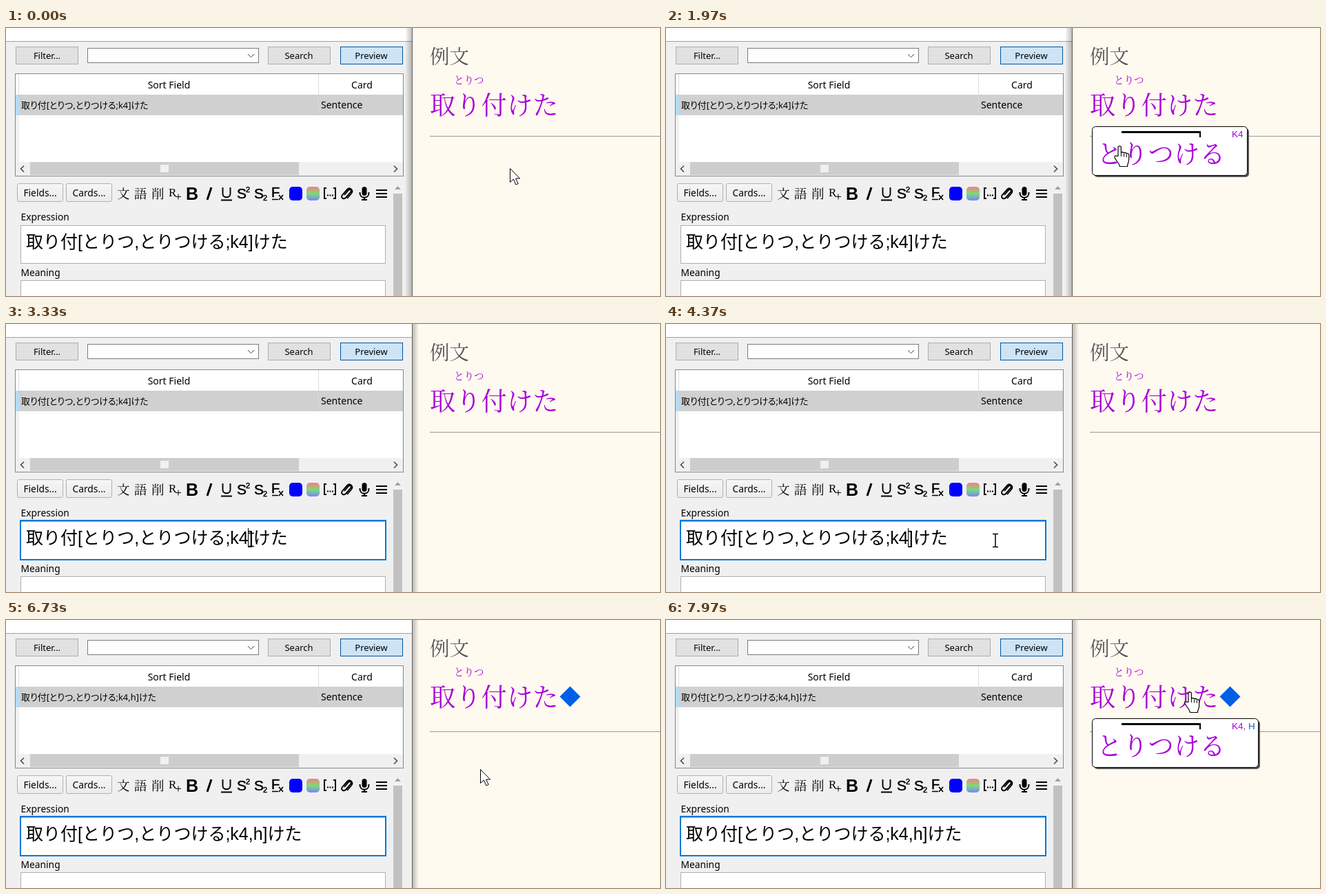
An HTML page that plays this animation: 949x390 px, repeating every 8000 ms.

```html
<!DOCTYPE html>
<html lang="ja">
<head>
<meta charset="utf-8">
<title>Card preview</title>
<style>
html, body { margin: 0; width: 100%; height: 100%; overflow: hidden; background: #f0f0f0; }
svg { display: block; }
text { font: 13.8px "Noto Sans", "Noto Sans CJK JP", sans-serif; white-space: pre; }
.btn text { font-size: 13px; }
.mid { text-anchor: middle; }
.head text { font-size: 14px; }
.field text { font: 300 25px "Liberation Sans", "Noto Sans CJK JP", sans-serif; }
.row { font-feature-settings: "palt"; font-size: 12.95px; }
.serif text { font-family: "Noto Serif CJK JP", "Noto Serif JP", "Noto Sans CJK JP", serif; font-weight: 300; }
.icons text { font: 21px "Liberation Sans", sans-serif; }
.icons .kanji { font: 18.5px "Noto Serif CJK JP", "Noto Sans CJK JP", serif; }
.icons .thick { stroke: #000; stroke-width: .5; }
.icons .small { font-size: 11px; }
.line { fill: none; stroke: #000; }
</style>
</head>
<body>
<svg width="949" height="390" viewBox="0 0 949 390">
  <defs>
    <linearGradient id="face" x2="0" y2="1"><stop stop-color="#f6f6f6"/><stop offset="1" stop-color="#ebebeb"/></linearGradient>
    <linearGradient id="hues" x2="0" y2="1"><stop stop-color="#ff7888"/><stop offset=".5" stop-color="#77dd77"/><stop offset="1" stop-color="#7b83ff"/></linearGradient>
    <linearGradient id="dim"><stop stop-opacity="0"/><stop offset="1" stop-opacity=".25"/></linearGradient>
    <linearGradient id="dimR"><stop stop-opacity=".25"/><stop offset="1" stop-opacity="0"/></linearGradient>
  </defs>

  <rect width="949" height="390" fill="#f0f0f0"/>
  <rect width="589" height="19" fill="#fff"/>
  <rect y="19" width="589" height="1" fill="#a0a0a0"/>

  <g class="btn mid" fill="#e1e1e1" stroke="#adadad">
    <rect x="14.5" y="27.5" width="90" height="25"/>
    <rect x="380.5" y="27.5" width="90" height="25"/>
    <rect x="485.5" y="27.5" width="90" height="25" fill="#cce4f7" stroke="#005499"/>
    <rect x="118.5" y="29.5" width="248" height="21" fill="#fff" stroke="#7a7a7a"/>
    <path d="M351 38l4.500 4.500 4.500-4.500" fill="none" stroke="#444"/>
    <g fill="#000" stroke="none">
      <text x="59.500" y="45">Filter...</text>
      <text x="425" y="45">Search</text>
      <text x="530" y="45">Preview</text>
    </g>
  </g>

  <rect x="13.500" y="66.500" width="563" height="149" fill="#fff" stroke="#828790"/>
  <rect x="14" y="127" width="5" height="68" fill="#f0f0f0"/>
  <path d="M18.500 67V97M453.500 67V97" stroke="#dcdcdc"/>
  <rect x="19" y="97" width="557" height="30" fill="#d0d0d0"/>
  <rect x="14" y="97" width="5" height="30" fill="#b5dcf5"/>
  <path d="M453.500 97V126" stroke="#dcdcdc"/>
  <rect x="14" y="195" width="562" height="20" fill="#f0f0f0"/>
  <rect x="35" y="195" width="390" height="19" fill="#cdcdcd"/>
  <rect x="224" y="199" width="12" height="11" fill="#f0f0f0"/>
  <path d="M26 200.500l-4.500 4.500 4.500 4.500M563 200.500l4.500 4.500-4.500 4.500" fill="none" stroke="#505050" stroke-width="1.700"/>
  <g class="head">
    <text class="mid" x="236.500" y="88">Sort Field</text>
    <text class="mid" x="516.500" y="88">Card</text>
    <text x="457" y="117">Sentence</text>
  </g>
  <text class="row" id="row" x="22" y="117"></text>

  <g fill="url(#face)" stroke="#b0b0b0">
    <rect x="16.500" y="226.500" width="66" height="26" rx="2"/>
    <rect x="87.500" y="226.500" width="66" height="26" rx="2"/>
  </g>
  <text class="mid" x="49.500" y="245">Fields...</text>
  <text class="mid" x="120.500" y="245">Cards...</text>

  <g class="icons">
    <text class="kanji" x="161" y="248">文</text>
    <text class="kanji" x="186" y="248">語</text>
    <text class="kanji" x="211" y="248">削</text>
    <text x="236" y="245" style="font:17px 'Liberation Serif',serif">R</text>
    <path class="line" d="M246 245.500h8M250 241.500v8"/>
    <text x="261" y="250" style="font-weight:bold;font-size:25px">B</text>
    <path class="line" d="M298 232l-6 18" stroke-width="3"/>
    <path class="line" d="M314.500 232v9c0 7 11 7 11 0v-9M312 250.500h16" stroke-width="1.900"/>
    <g class="thick">
      <text x="335" y="248">S</text><text class="small" x="348" y="239">2</text>
      <text x="360" y="248">S</text><text class="small" x="373" y="251">2</text>
      <text x="385" y="246" style="font-size:20px">F</text>
    </g>
    <path class="line" d="M386 249.500h9M396 243l6 7M402 243l-6 7" stroke-width="1.700"/>
    <rect x="411" y="231" width="19" height="20" rx="5" fill="#00f"/>
    <rect x="436" y="231" width="19" height="20" rx="5" fill="url(#hues)"/>
    <path class="line" d="M465 233h-3v15h3M475 233h3v15h-3" stroke-width="2"/>
    <path class="line" d="M466 243.500h2m1.500 0h2m1.500 0h2" stroke-width="2"/>
    <path class="line" d="M491 243l6-7c2-2 5 0 3 3l-7 8c-3 3-8 0-5-4l7-8c4-4 10 1 6 6l-6 7" stroke-width="1.900"/>
    <rect x="516.500" y="231" width="7" height="13" rx="3.500"/>
    <path class="line" d="M513.500 239v1c0 9 13 9 13 0v-1M520 246v4M516 250h8" stroke-width="2"/>
    <path class="line" d="M537 236h16M537 241h16M537 246h16" stroke-width="2"/>
  </g>

  <rect x="561" y="226" width="16" height="164" fill="#f1f1f1"/>
  <path d="M564 235l4.500-5 4.500 5z" fill="#a3a3a3"/>
  <rect id="thumb" x="562" y="241" width="13" height="149"/>

  <text x="21.500" y="280">Expression</text>
  <text x="21.500" y="361">Meaning</text>
  <g class="field">
    <rect x="21.500" y="287.500" width="529" height="55" fill="#fff" stroke="#b0b0b0"/>
    <rect x="21.500" y="367.500" width="529" height="40" fill="#fff" stroke="#b0b0b0"/>
    <rect id="focus" x="21" y="286" width="530" height="57" fill="none" stroke="#0078d7" stroke-width="2"/>
    <text id="expr" x="29" y="319.500"></text>
    <rect id="caret" y="297" width="1" height="28"/>
  </g>

  <rect x="589" width="360" height="390" fill="#fffaf0"/>
  <rect id="shadeL" x="579" width="10" height="390" fill="url(#dim)"/>
  <rect id="shadeR" x="590" width="9" height="390" fill="url(#dimR)"/>
  <rect x="589" width="1" height="390" fill="#606060"/>

  <g class="serif" fill="#a800dc">
    <text x="615" y="51.500" fill="#555" style="font-size:28.500px">例文</text>
    <text x="650" y="81" style="font-size:14.500px">とりつ</text>
    <text x="615" y="126" style="font-size:37.300px">取り付けた</text>
    <path id="diamond" d="M818.500 96.500l15 15-15 15-15-15z" fill="#005fe6"/>
    <rect id="rule" x="615" width="334" height="1" fill="#999"/>
    <g id="popup">
      <rect id="drop" x="621" y="146" height="71" rx="5" fill="#555"/>
      <rect id="card" x="618.500" y="143.500" height="71" rx="5" fill="#fff" stroke="#000"/>
      <path d="M661 150h115v9h-2v-6H661z" fill="#000"/>
      <text x="625" y="197" style="font-size:37.300px">とりつける</text>
      <text x="821" y="159" style="font:13.500px 'Liberation Sans',sans-serif">K4<tspan id="tag">, <tspan fill="#005fe6">H</tspan></tspan></text>
    </g>
  </g>

  <g id="arrow"><path d="M.5.5v20l4.800-4.500 3.600 8 3.300-1.500-3.600-7.500h6z" fill="#fff" stroke="#000"/></g>
  <g id="hand">
    <path d="M-2 15V3a2.200 2.200 0 0 1 4.400 0v8c0-2 4.200-2 4.200.6 0-1.800 3.800-1.600 3.800.8 0-1.400 3.300-1.200 3.300 1.200V20c0 5-2.200 6-2.200 10.500H.5C.5 27-5 22-7 17.500c-.8-2.200 2-3.600 3.500-1.900z" fill="#fff" stroke="#000" stroke-width="1.200"/>
    <path class="line" d="M2.400 11v5M6.600 12v4.500M10.400 13v4"/>
  </g>
  <path id="beam" class="line" d="M-4-9.500h3l1 1 1-1h3M0-8.500v17M-4 9.500h3l1-1 1 1h3" stroke-width="1.500"/>
</svg>
<script>
const $ = id => document.getElementById(id);
const show = (id, on) => $(id).style.display = on ? '' : 'none';
const within = (t, ...spans) => spans.some(([a, b]) => t >= a && t < b);

// pointer hotspot: time, x, y
const track = [
  [0, 731, 204], [570, 731, 204], [800, 722, 102], [900, 718, 107], [970, 716, 127],
  [1300, 661, 172], [1830, 661, 172], [1970, 658, 171], [2170, 646, 102], [2260, 600, 120],
  [2630, 397, 299], [2670, 397, 299], [2730, 386, 304], [3070, 356, 314], [3330, 356, 314],
  [3800, 478, 314.5], [6330, 478, 314.5], [6730, 688, 217], [7130, 731, 99],
  [7800, 731, 99], [7970, 760, 104], [8000, 760, 104]
];

function pointer(t) {
  const i = track.findIndex(k => k[0] > t);
  const [t0, x0, y0] = track[i - 1], [t1, x1, y1] = track[i];
  const p = (t - t0) / (t1 - t0);
  return [x0 + (x1 - x0) * p, y0 + (y1 - y0) * p];
}

const sentence = extra => `取り付[とりつ,とりつける;k4${extra}]けた`;

function draw(now) {
  const t = now % 8000;
  const [x, y] = pointer(t);
  const typed = t < 4570 ? '' : t < 4870 ? ',' : ',h';
  const clicked = t >= 3300, updated = t >= 5480;
  const popup = within(t, [740, 2230], [7020, 8000]);

  $('expr').textContent = sentence(typed);
  $('row').textContent = sentence(t >= 5430 ? ',h' : '');
  $('caret').setAttribute('x', [351, 358, 372][typed.length]);
  show('caret', within(t, [3300, 3830], [4370, 5430], [5930, 6430], [6930, 7570]));
  show('focus', clicked);
  show('shadeL', !clicked);
  show('shadeR', clicked);
  $('thumb').setAttribute('fill', x > 561 && x < 576 && y > 241 ? '#a8a8a8' : '#c1c1c1');

  show('diamond', updated);
  $('rule').setAttribute('y', updated ? 162 : 157);
  show('popup', popup);
  show('tag', updated);
  for (const id of ['drop', 'card']) $(id).setAttribute('width', updated ? 241 : 225);

  const kind = popup ? 'hand' : x < 551 && y > 287 ? 'beam' : 'arrow';
  for (const id of ['arrow', 'hand', 'beam']) show(id, id === kind);
  $(kind).setAttribute('transform', `translate(${Math.round(x)} ${Math.round(y)})`);
}

const start = performance.now();
function frame() {
  draw(performance.now() - start);
  requestAnimationFrame(frame);
}
frame();
</script>
</body>
</html>
```
